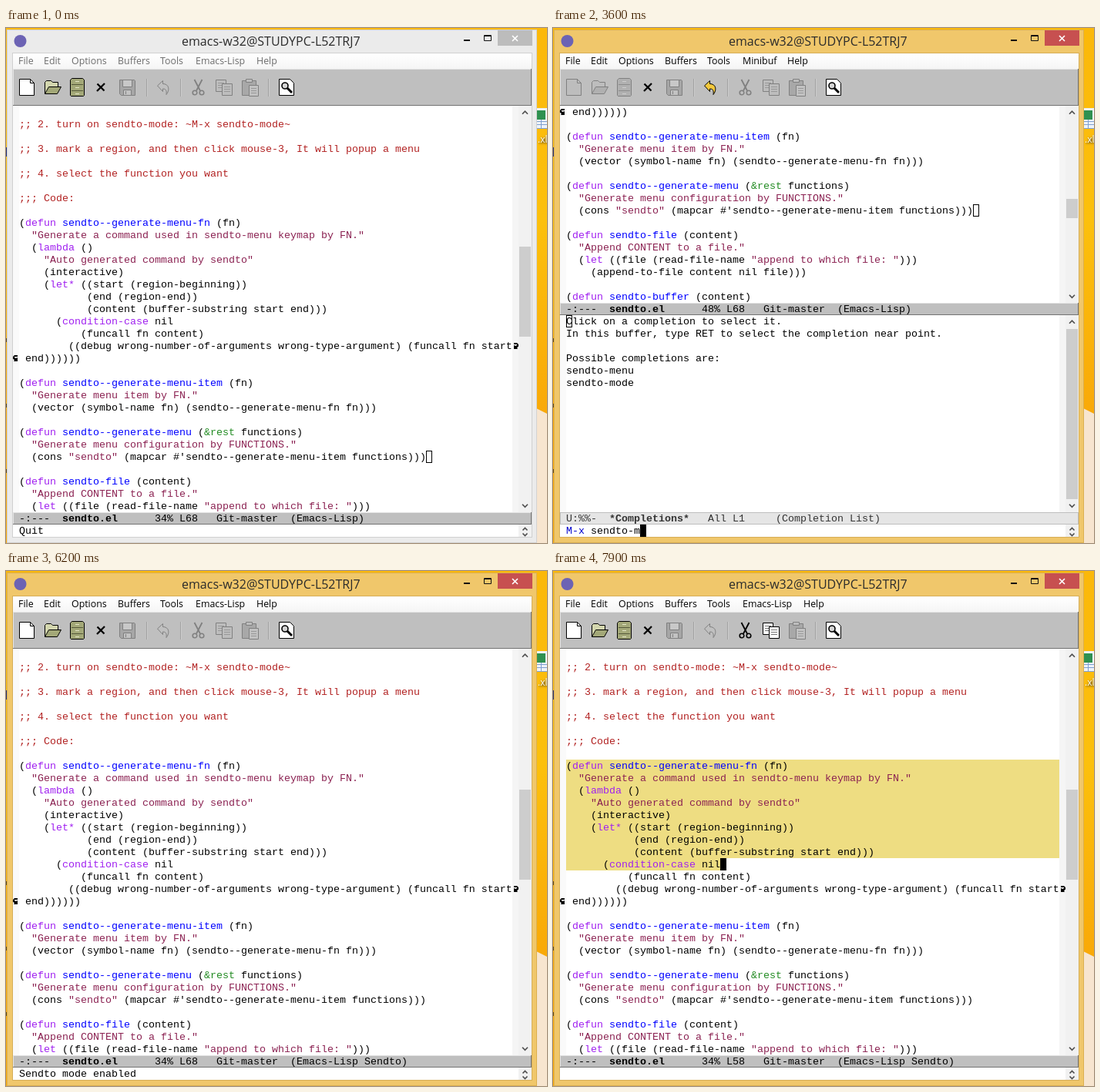
Animation, 702 px wide and 669 px high, one loop 8000 ms. Source, as an HTML page with a canvas:

```html
<!DOCTYPE html>
<html lang="en">
<head>
<meta charset="utf-8">
<title>Editor session</title>
<style>
html, body { margin: 0; width: 100%; height: 100%; overflow: hidden; }
canvas { display: block; width: 702px; height: 669px; }
</style>
</head>
<body>
<canvas id="stage" width="702" height="669"></canvas>
<script>
const ctx = document.getElementById('stage').getContext('2d');
const LOOP = 8000, CW = 8, RH = 16, LEFT = 17, TOP = 101;
const MONO = '13.333px "Liberation Mono", "Courier New", monospace';
const UI = '"Open Sans", "Noto Sans", sans-serif';

const CODE = `
;; 2. turn on sendto-mode: ~M-x sendto-mode~

;; 3. mark a region, and then click mouse-3, It will popup a menu

;; 4. select the function you want

;;; Code:

(defun sendto--generate-menu-fn (fn)
  "Generate a command used in sendto-menu keymap by FN."
  (lambda ()
    "Auto generated command by sendto"
    (interactive)
    (let* ((start (region-beginning))
           (end (region-end))
           (content (buffer-substring start end)))
      (condition-case nil
          (funcall fn content)
        ((debug wrong-number-of-arguments wrong-type-argument) (funcall fn start
 end))))))

(defun sendto--generate-menu-item (fn)
  "Generate menu item by FN."
  (vector (symbol-name fn) (sendto--generate-menu-fn fn)))

(defun sendto--generate-menu (&rest functions)
  "Generate menu configuration by FUNCTIONS."
  (cons "sendto" (mapcar #'sendto--generate-menu-item functions)))

(defun sendto-file (content)
  "Append CONTENT to a file."
  (let ((file (read-file-name "append to which file: ")))
    (append-to-file content nil file)))

(defun sendto-buffer (content)
  "Append CONTENT to a buffer."
  (with-current-buffer (read-buffer "append to which buffer: ")
    (save-excursion
      (goto-char (point-max))
      (insert content))))

(defun sendto-mail (content)
  "Mail the CONTENT."
  (mail)
  (goto-char (point-max))
  (insert content))

(defun sendto-appt (content)
  "Add an appointment for today at sometime with message CONTENT."
  (let ((time (read-string "Time (hh:mm[am/pm]): ")))
    (appt-add time content)
    (appt-activate 1)))`.split('\n');

const COMPLETIONS = [
  'Click on a completion to select it.',
  'In this buffer, type RET to select the completion near point.',
  '',
  'Possible completions are:',
  'sendto-menu',
  'sendto-mode'
];

const WRAP_ROW = 19;
const POINT = { row: 28, col: 66 };
const DRAG = { from: 7500, row: 9, endRow: 17, endCol: 25 };

const TOKEN = /(;.*)|("[^"]*")|((?<=\()(?:defun|lambda|let\*?|condition-case|with-current-buffer|save-excursion)(?=\s|$))|((?<=\(defun )\S+)|(&rest)/g;
const TOKEN_COLORS = ['#b22222', '#8b2252', '#a020f0', '#0000ff', '#228b22'];

// Hard-cut timelines: [start ms, value]
const CURSOR = [[0, 'hollow'], [500, 'solid'], [900, 'off'], [1400, 'solid'], [1800, 'hollow'],
  [4800, 'solid'], [5300, 'off'], [5800, 'solid'], [6200, 'off'], [6700, 'solid'], [7100, 'off'], [7500, 'solid']];
const TYPED = [[1800, ''], [2300, 'se'], [2500, 'sen'], [2600, 'send'], [2800, 'sendt'], [3000, 'sendto'],
  [3200, 'sendto-'], [3400, 'sendto-m'], [4000, 'sendto-mo'], [4300, 'sendto-mod'], [4400, 'sendto-mode']];

const at = (steps, t) => steps.reduce((v, s) => t >= s[0] ? s[1] : v, steps[0][1]);
const within = (t, a, b) => t >= a && t < b;

function rect(x, y, w, h, color) {
  ctx.fillStyle = color;
  ctx.fillRect(x, y, w, h);
}

function shape(d, fill, stroke, width = 1) {
  const path = new Path2D(d);
  if (fill) { ctx.fillStyle = fill; ctx.fill(path); }
  if (stroke) { ctx.strokeStyle = stroke; ctx.lineWidth = width; ctx.stroke(path); }
}

function disc(x, y, r, fill, stroke, width = 1) {
  shape(`M${x - r} ${y}a${r} ${r} 0 1 0 ${2 * r} 0a${r} ${r} 0 1 0 ${-2 * r} 0z`, fill, stroke, width);
}

function label(s, x, y, color, font) {
  ctx.font = font;
  ctx.fillStyle = color;
  ctx.fillText(s, x, y);
}

const mono = (s, x, top, color = '#000', bold = false) =>
  label(s, x, top + 12, color, (bold ? 'bold ' : '') + MONO);

// Grey bar with a one-pixel bevel
function bar(y, h, fill, light, dark) {
  rect(9, y, 673, h, dark);
  rect(9, y, 672, h - 1, light);
  rect(10, y + 1, 671, h - 2, fill);
}

function codeLine(line, top) {
  let pos = 0;
  const put = (s, color) => {
    mono(s, LEFT + pos * CW, top, color);
    pos += s.length;
  };
  for (const m of line.matchAll(TOKEN)) {
    put(line.slice(pos, m.index));
    put(m[0], TOKEN_COLORS[m.slice(1).findIndex(Boolean)]);
  }
  put(line.slice(pos));
}

function cursor(kind, x, y, char = '') {
  if (kind === 'solid') {
    rect(x, y, CW, RH, '#000');
    if (char.trim()) mono(char, x, y, '#fff');
  } else if (kind === 'hollow') {
    ctx.strokeStyle = '#000';
    ctx.lineWidth = 1;
    ctx.strokeRect(x + 0.5, y + 0.5, CW - 1, RH - 1);
  }
}

function wrapArrow(x, y, mirrored) {
  ctx.save();
  ctx.translate(mirrored ? x + 8 : x, y);
  if (mirrored) ctx.scale(-1, 1);
  shape('M2 0H6L8 2V4.5L6 6.5L7 8H2V3L4.3 4L6 3V2H2z', '#000');
  ctx.restore();
}

const chevron = (x, y, dir, size = 3.5) =>
  shape(`M${x - size} ${y + dir * size / 2}l${size} ${-dir * size}l${size} ${dir * size}`, null, '#505050', 1.7);

function pane(top, bottom, thumbTop, thumbBottom) {
  rect(9, top, 673, bottom - top, '#fff');
  rect(9, top, 8, bottom - top, '#fafafa');
  rect(657, top, 8, bottom - top, '#f5f5f5');
  rect(665, top, 17, bottom - top, '#f1f1f1');
  rect(666, thumbTop, 15, thumbBottom - thumbTop, '#cdcdcd');
  chevron(673.5, top + 9, 1);
  chevron(673.5, bottom - 8.5, -1);
}

function modeLine(y, status, name, rest, active) {
  const ink = active ? '#000' : '#333';
  if (active) bar(y, RH, '#bfbfbf', '#e5e5e5', '#737373');
  else bar(y, RH, '#e5e5e5', '#bfbfbf', '#bfbfbf');
  mono(status, 17, y, ink);
  mono(name, 73, y, ink, true);
  mono(rest, 73 + name.length * CW, y, ink);
}

function desktop() {
  const g = ctx.createLinearGradient(0, 0, 0, 500);
  g.addColorStop(0, '#fbb80a');
  g.addColorStop(0.5, '#fcc00c');
  g.addColorStop(1, '#f9a908');
  rect(0, 0, 702, 669, g);
  shape('M688 494L702 501V669H688z', '#f7e5cf');

  // spreadsheet file and its shadowed caption
  rect(689, 104, 13, 27, '#eef3f9');
  shape('M689 121.5h13M689 125.5h13M689 130.5h13M694.5 119v12', null, '#7f9fd0');
  rect(689, 107, 11, 12, '#2f9150');
  ctx.save();
  ctx.shadowColor = '#000';
  ctx.shadowBlur = 3;
  ctx.shadowOffsetX = ctx.shadowOffsetY = 1;
  label('.xl', 690, 149, '#fff', '12px ' + UI);
  ctx.restore();

  rect(0, 155, 1, 12, '#1f2a70');
  for (const y of [403, 488, 573]) rect(0, y, 1, 5, '#5a4310');
}

function frame(focused) {
  rect(1, 2, 688, 667, focused ? '#dcb050' : '#d2d2d2');
  rect(2, 3, 686, 665, focused ? '#f0c76b' : '#ebebeb');
  rect(8, 32, 675, 630, focused ? '#d6ae58' : '#d0d0d0');
  disc(18.5, 17, 8, '#6c63b4');
  label('emacs-w32@STUDYPC-L52TRJ7', 228, 23, '#2b2b2b', '16px ' + UI);
  rect(594, 15, 8, 2, '#111');
  shape('M620.5 9.5h9v7h-9zM620 10.5h10', null, '#111');
  rect(638, 3, 45, 20, focused ? '#c75050' : '#bcbcbc');
  shape('M657 10l7 7M664 10l-7 7', null, '#fff', 1.6);
}

function menuBar(focused, mini) {
  const g = ctx.createLinearGradient(0, 33, 0, 53);
  g.addColorStop(0, '#fff');
  g.addColorStop(1, '#f5f5f5');
  rect(9, 33, 673, 20, g);
  const items = [['File', 16], ['Edit', 49], ['Options', 85], ['Buffers', 145], ['Tools', 200],
    [mini ? 'Minibuf' : 'Emacs-Lisp', 246], ['Help', mini ? 304 : 325]];
  for (const [s, x] of items) label(s, x, 47, focused ? '#000' : '#6d6d6d', '12.4px ' + UI);
}

function toolBar(files, undo, region) {
  const ink = on => on ? '#000' : '#808080';
  const paper = on => on ? '#fff' : '#bdbdbd';
  bar(53, 48, '#bfbfbf', '#e5e5e5', '#737373');
  for (const x of [182, 226, 340]) {
    rect(x, 66, 1, 23, '#a2a2a2');
    rect(x + 1, 66, 1, 23, '#cdcdcd');
  }
  // new, open, directory
  const f = ink(files), olive = files ? '#a3a878' : '#b0b0b0';
  shape('M17.5 66.5h14l5 5v16h-19z', paper(files), f);
  shape('M31.5 66.5v5h5', null, f);
  shape('M50.5 85.5v-15l2-2h6l2 2h7v6', files ? '#d3d6ae' : '#bdbdbd', f);
  shape('M50.5 85.5l5-9h16l-5 9z', olive, f);
  shape('M83.5 67.5l2-2h14l2 2v20l-1 1h-16l-1-1z', olive, f);
  shape('M85 73.5h15M85 81.5h15', null, files ? '#55593a' : '#8c8c8c');
  shape('M90 69.5h5M90 77.5h5M90 85.5h5', null, files ? '#e4e6c8' : '#cfcfcf');
  // close, save
  shape('M118.5 72.5l9 9M128 72l-10 10', null, '#000', 2.3);
  const off = ink(false);
  shape('M147.5 67.5h19l1 1v19h-18l-2-2z', '#a6a6a6', off);
  shape('M151.5 67.5h12v9h-12z', '#c8c8c8', off);
  shape('M152.5 80.5h10v7h-10zM155.5 82v4', '#c2c2c2', off);
  // undo
  shape('M196.5 75l7-6.5v4c8 0 9.5 8 4.5 14c.8-6-1-7.5-4.5-7.5v3.5z', undo ? '#f3c83c' : '#c0c0c0', ink(undo));
  // cut, copy, paste
  const r = ink(region);
  shape('M244.5 67l7.5 14.5M254.5 67l-7.5 14.5', null, r, 1.8);
  disc(245, 84, 2.8, null, r, 1.6);
  disc(254, 84, 2.8, null, r, 1.6);
  for (const [x, y] of [[272, 67], [280, 72]]) {
    shape(`M${x + 0.5} ${y + 0.5}h13v15h-13z`, paper(region), r);
    shape(`M${x + 3} ${y + 4.5}h8m-8 3h8m-8 3h8`, null, region ? '#777' : '#999');
  }
  shape('M306.5 68.5h18v19h-18z', '#a8a8a8', off);
  shape('M311.5 66.5h8v4h-8z', '#bdbdbd', off);
  shape('M315.5 74.5h12v14h-12z', '#c2c2c2', off);
  shape('M318 78.5h7m-7 3h7m-7 3h7', null, '#999');
  // search
  shape('M354.5 66.5h14l5 5v16h-19z', '#fff', '#000');
  shape('M365 78l6 6', null, '#000', 3);
  disc(362, 75, 4, '#d4d4d4', '#000', 1.6);
}

function miniBuffer(t) {
  rect(9, 645, 673, RH, '#fff');
  rect(665, 645, 17, RH, '#f1f1f1');
  chevron(673.5, 651, 1, 3);
  chevron(673.5, 658, -1, 3);
  if (within(t, 1800, 4800)) {
    const typed = at(TYPED, t);
    mono('M-x', LEFT, 645, '#0000cd');
    mono(typed, LEFT + 4 * CW, 645);
    cursor('solid', LEFT + (4 + typed.length) * CW, 645);
  } else if (t < 1800) {
    mono('Quit', LEFT, 645);
  } else if (t < DRAG.from) {
    mono('Sendto mode enabled', LEFT, 645);
  }
}

function buffer(t, split, scrolled) {
  const first = scrolled ? 20 : 0;
  const rows = split ? 16 : 33;
  const bottom = TOP + rows * RH;
  const rowY = row => TOP + (row - first) * RH;
  const selecting = t >= DRAG.from;
  let point = POINT;

  pane(TOP, bottom, ...(split ? [222, 247] : scrolled ? [351, 465] : [284, 401]));
  if (selecting) {
    const k = Math.min(4, Math.floor((t - DRAG.from) / 100)) / 4;
    point = { row: DRAG.row + k * (DRAG.endRow - DRAG.row), col: Math.round(k * DRAG.endCol) };
    rect(LEFT, rowY(DRAG.row), 640, (point.row - DRAG.row) * RH, '#eedd82');
    rect(LEFT, rowY(point.row), point.col * CW, RH, '#eedd82');
  }
  for (let i = 0; i < rows; i++) codeLine(CODE[first + i], TOP + i * RH);
  if (!scrolled) wrapArrow(657, rowY(WRAP_ROW) + 4, false);
  wrapArrow(9, rowY(WRAP_ROW + 1) + 4, true);
  cursor(at(CURSOR, t), LEFT + point.col * CW, rowY(point.row), CODE[point.row][point.col]);

  const mode = t >= 4800 ? '(Emacs-Lisp Sendto)' : '(Emacs-Lisp)';
  const line = selecting ? point.row + 41 : 68;
  modeLine(bottom, '-:---', 'sendto.el', `      ${scrolled ? 48 : 34}% L${line}   Git-master  ${mode}`, true);
}

function completions() {
  const top = 373;
  pane(top, 629, 391, 612);
  COMPLETIONS.forEach((s, i) => mono(s, LEFT, top + i * RH));
  cursor('hollow', LEFT, top);
  modeLine(629, 'U:%%-', '*Completions*', '   All L1     (Completion List)', false);
}

function draw(t) {
  const focused = t >= 500;
  const mini = within(t, 1900, 4800);
  const split = within(t, 3500, 4400);
  desktop();
  frame(focused);
  menuBar(focused, mini);
  toolBar(!mini, within(t, 3600, 4800), t >= DRAG.from);
  buffer(t, split, within(t, 3500, 4800));
  if (split) completions();
  miniBuffer(t);
}

const start = performance.now();
function tick() {
  draw((performance.now() - start) % LOOP);
  requestAnimationFrame(tick);
}
tick();
</script>
</body>
</html>
```
